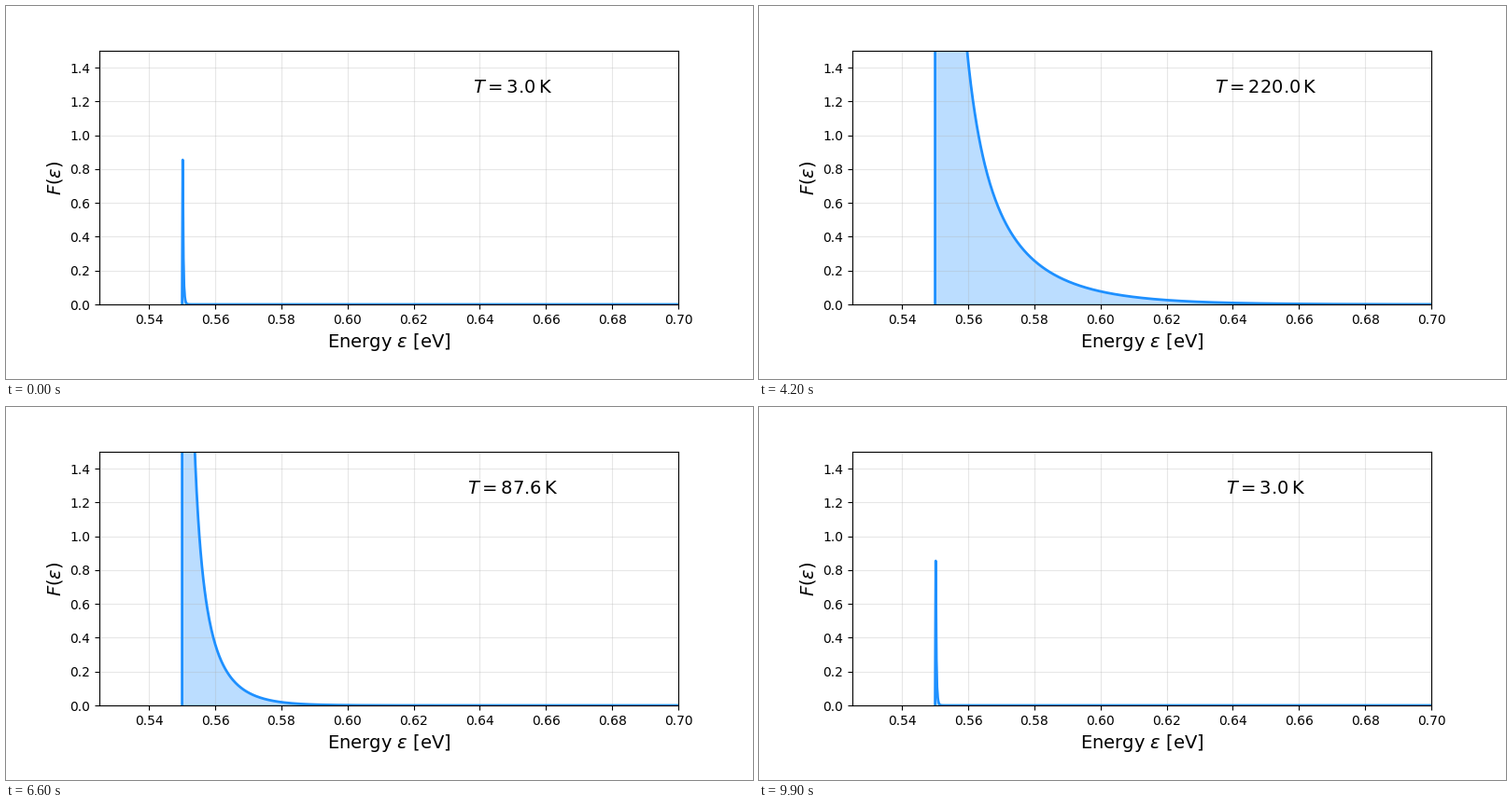
A matplotlib script that plays this animation: 800 px wide and 400 px high, repeating every 10 s.

```python
import matplotlib.pyplot as plt
import numpy as np
from matplotlib.animation import FuncAnimation

K_B = 8.617333e-5  # eV / K
MU = 0.55          # eV
T_MIN, T_MAX = 3.0, 450.0
STEPS = 50
COLOR = "dodgerblue"

energy = np.linspace(MU, 0.70, 750)


def occupation(temp):
    """Bose-Einstein distribution, starting from zero at the potential."""
    f = np.zeros_like(energy)
    f[1:] = 1 / np.expm1((energy[1:] - MU) / (K_B * temp))
    return f


def temperature(i):
    """Geometric sweep up and back down."""
    step = min(i, 2 * STEPS - 1 - i)
    return T_MIN * (T_MAX / T_MIN) ** (step / (STEPS - 1))


def area(f):
    """Closed outline between the curve and the energy axis."""
    x = np.concatenate([energy, energy[::-1]])
    y = np.concatenate([f, np.zeros_like(f)])
    return [np.column_stack([x, y])]


plt.rcParams["font.family"] = "DejaVu Sans"
fig, ax = plt.subplots(figsize=(8, 4), dpi=100)
fig.subplots_adjust(left=0.125, right=0.9, bottom=0.2, top=0.88)

ax.set_xlim(0.525, 0.70)
ax.set_ylim(0, 1.5)
ax.set_xlabel(r"Energy $\varepsilon$ [eV]", fontsize=14)
ax.set_ylabel(r"$F(\varepsilon)$", fontsize=14)
ax.grid(alpha=0.3)

start = occupation(T_MIN)
line, = ax.plot(energy, start, color=COLOR, lw=2)
fill = ax.fill_between(energy, start, color=COLOR, alpha=0.3)
label = ax.text(0.65, 1.25, "", fontsize=14, ha="center")


def update(i):
    temp = temperature(i)
    f = occupation(temp)
    line.set_ydata(f)
    fill.set_verts(area(f))
    label.set_text(rf"$T = {temp:.1f}\,\mathrm{{K}}$")
    return line, fill, label


anim = FuncAnimation(fig, update, frames=2 * STEPS, interval=100,
                     repeat=True, repeat_delay=0)
plt.show()
```
